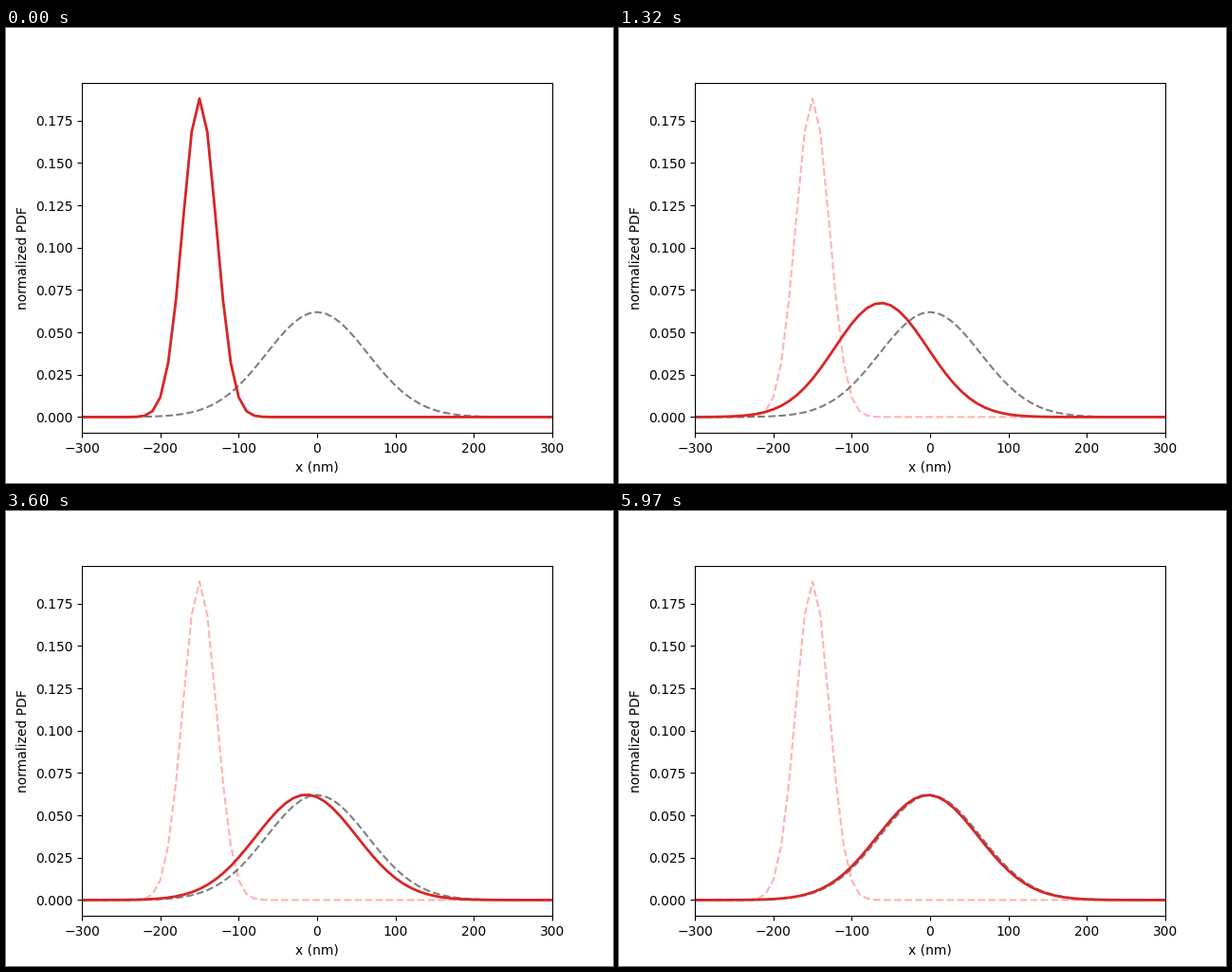
A matplotlib script for the animation above (6 s loop, 640 by 480 pixels).

```python
import numpy as np
import matplotlib.pyplot as plt
from matplotlib.animation import FuncAnimation

FRAMES = 200
INTERVAL = 30
STEP = 10.0                              # grid spacing, nm
DURATION = 3e-3                          # simulated time, s

kT = 1.380649e-23 * 300
stiffness = 1e-6
drag = 6 * np.pi * 8e-4 * 50e-9
variance = kT / stiffness * 1e18         # nm^2
diffusion = kT / drag * 1e18             # nm^2 / s

x = np.linspace(-300, 300, 61)


def normalize(p):
    return p / p.sum()


steady = normalize(np.exp(-x**2 / (2 * variance)))
initial = normalize(np.exp(-((x + 150) / 30)**2))


def hop_spectrum():
    """Eigen-decomposition of the symmetrized nearest-neighbour hopping matrix."""
    slope = np.diff(x**2) / (4 * variance)
    rate = diffusion / STEP**2
    right = np.append(rate * np.exp(-slope), 0)
    left = np.insert(rate * np.exp(slope), 0, 0)
    link = np.full(x.size - 1, rate)
    matrix = np.diag(link, 1) + np.diag(link, -1) - np.diag(right + left)
    return np.linalg.eigh(matrix)


decay, modes = hop_spectrum()
root = np.sqrt(steady)
weights = modes.T @ (initial / root)


def density(t):
    return root * (modes @ (np.exp(decay * t) * weights))


times = np.linspace(0, DURATION, FRAMES)

fig, ax = plt.subplots(figsize=(6.4, 4.8), dpi=100)
ax.plot(x, steady, color="k", ls="--", alpha=0.5)
ax.plot(x, initial, color="red", ls="--", alpha=0.3)
line, = ax.plot(x, initial, lw=2, color="C3")
ax.set(xlabel="x (nm)", ylabel="normalized PDF")
ax.margins(x=0)


def update(i):
    line.set_ydata(density(times[i]) if i else initial)
    return [line]


anim = FuncAnimation(fig, update, frames=FRAMES, interval=INTERVAL,
                     repeat=True, repeat_delay=0)
plt.show()
```
